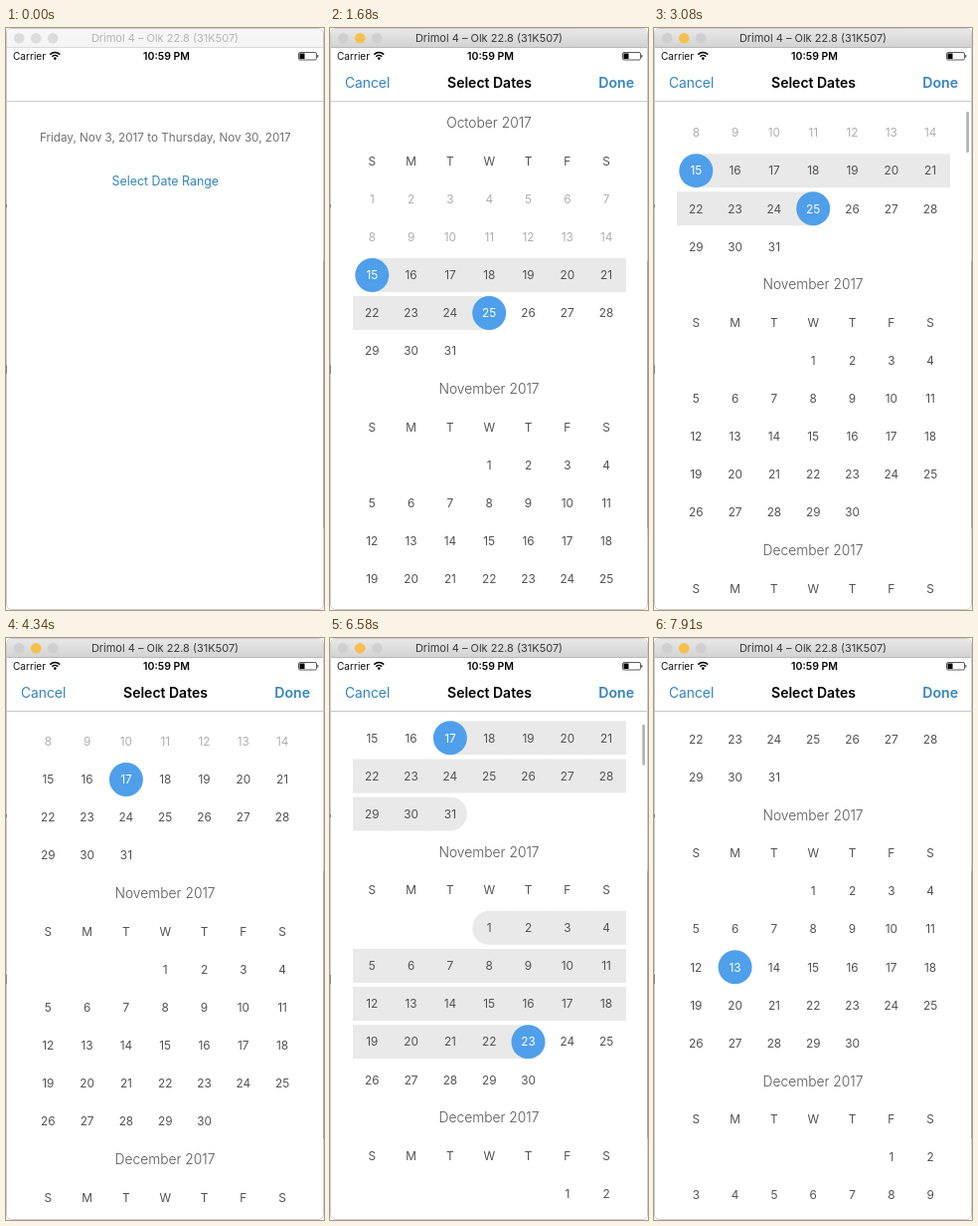
Animation of 320 by 584 pixels, one loop 8 s. Source, as an HTML page with a canvas:

```html
<!DOCTYPE html>
<html lang="en">
<head>
<meta charset="utf-8">
<title>Date range picker</title>
<style>
  html, body { margin: 0; width: 100%; height: 100%; overflow: hidden; background: #fff; }
  canvas { display: block; }
</style>
</head>
<body>
<canvas id="stage" width="320" height="584"></canvas>
<script>
const ctx = document.getElementById('stage').getContext('2d');
const W = 320, H = 584, LOOP = 8000;
const FONT = 'Inter, Roboto, "Liberation Sans", sans-serif';
const BLUE = '#3383c0', DOT = '#4f9fea', BAND = '#e9e9e9', INK = '#505050', MUTED = '#aeaeae';

const HEADER_BOTTOM = 73.5;
const FIRST_ROW = 95.4, ROW = 38.12, FIRST_COL = 42.3, COL = 39.3, RADIUS = 17;
const ENABLED_FROM = 15;
const SHEET_START = 1023.4;

// Days are numbered continuously from October 1, 2017.
const MONTHS = [
  { name: 'October 2017', row: 0, lead: 0, days: 31, first: 1 },
  { name: 'November 2017', row: 7, lead: 3, days: 30, first: 32 },
  { name: 'December 2017', row: 14, lead: 5, days: 31, first: 62 }
];
const SELECTIONS = [
  { at: 0, from: 15, to: 25 },
  { at: 3710, from: 17, to: 17 },
  { at: 5600, from: 17, to: 54 },
  { at: 7840, from: 44, to: 44 }
];
const SCROLLS = [
  { start: 2450, end: 3290, by: 105.9, power: 2 },
  { start: 6230, end: 7070, by: 78.5, power: 1.36 }
];

const clamp = v => Math.min(1, Math.max(0, v));
const smooth = p => p * p * (3 - 2 * p);

function scrollAt(t) {
  return SCROLLS.reduce((sum, s) => {
    const p = clamp((t - s.start) / (s.end - s.start));
    return sum + s.by * smooth(1 - Math.pow(1 - p, s.power));
  }, 0);
}

function indicatorAlpha(t) {
  return Math.max(...SCROLLS.map(s =>
    t < s.start + 40 ? 0 : 1 - clamp((t - s.end) / 170)));
}

// Critically damped spring, as a remaining distance.
function sheetOffset(t) {
  const x = Math.max(0, t - SHEET_START) / 1000 * 18.26;
  return 548 * (1 + x) * Math.exp(-x);
}

function text(str, x, y, size, color, weight = 400, align = 'center') {
  ctx.font = `${weight} ${size}px ${FONT}`;
  ctx.fillStyle = color;
  ctx.textAlign = align;
  ctx.textBaseline = 'alphabetic';
  ctx.fillText(str, x, y + size * 0.36);
}

function rect(x, y, w, h, color) {
  ctx.fillStyle = color;
  ctx.fillRect(x, y, w, h);
}

function circle(x, y, r, color) {
  ctx.fillStyle = color;
  ctx.beginPath();
  ctx.arc(x, y, r, 0, Math.PI * 2);
  ctx.fill();
}

function rounded(x, y, w, h, radii, color) {
  ctx.fillStyle = color;
  ctx.beginPath();
  ctx.roundRect(x, y, w, h, radii);
  ctx.fill();
}

function titleBar(active) {
  const shade = ctx.createLinearGradient(0, 1, 0, 20);
  shade.addColorStop(0, active ? '#e9e8e9' : '#f7f7f7');
  shade.addColorStop(1, active ? '#d3d2d3' : '#f4f4f4');
  rounded(1, 1, 318, 19, [5, 5, 0, 0], shade);
  rect(1, 19, 318, 1, active ? '#b9b9b9' : '#dadada');
  const off = active ? '#cfcfcf' : '#dcdcdc';
  [off, active ? '#f6c04e' : off, off].forEach((c, i) => circle(13.2 + 17 * i, 10.2, 5.3, c));
  text('Drimol 4 – Olk 22.8 (31K507)', 160, 10.3, 11, active ? '#383838' : '#b4b4b4');
}

function statusBar() {
  text('Carrier', 7, 28, 10.1, '#111', 400, 'left');
  text('10:59 PM', 161.5, 28, 10.5, '#000', 600);
  ctx.strokeStyle = '#000';
  ctx.lineWidth = 1.5;
  for (const r of [4.1, 7]) {
    ctx.beginPath();
    ctx.arc(49.3, 31.6, r, -Math.PI * 0.75, -Math.PI * 0.25);
    ctx.stroke();
  }
  circle(49.3, 30.6, 1.3, '#000');
  ctx.lineWidth = 0.8;
  ctx.strokeStyle = '#333';
  ctx.beginPath();
  ctx.roundRect(294.5, 24.5, 18, 7.5, 1.5);
  ctx.stroke();
  rect(295.5, 25.5, 5, 5.5, '#000');
  rect(313.3, 27, 1, 2.6, '#333');
}

function homeScreen(t) {
  rect(1, 73, 318, 1, '#cfcfcf');
  text('Friday, Nov 3, 2017 to Thursday, Nov 30, 2017', 160.3, 109.5, 11.7, '#707070');
  ctx.globalAlpha = t >= 910 ? 0.6 : 1;
  text('Select Date Range', 160.3, 153.4, 12.4, BLUE);
  ctx.globalAlpha = 1;
}

function bandPiece(day, date, col, x, y, month, sel) {
  const opens = day === sel.from, closes = day === sel.to;
  const monthStart = date === 1, monthEnd = date === month.days;
  const left = opens ? x : monthStart ? x - RADIUS : col === 0 ? 23 : x - COL / 2 - 0.3;
  const right = closes ? x : monthEnd ? x + RADIUS : col === 6 ? 298 : x + COL / 2 + 0.3;
  const l = monthStart && !opens ? RADIUS : 0;
  const r = monthEnd && !closes ? RADIUS : 0;
  rounded(left, y - RADIUS, right - left, RADIUS * 2, [l, r, r, l], BAND);
}

function calendar(t) {
  const top = FIRST_ROW - scrollAt(t);
  const sel = SELECTIONS.findLast(s => t >= s.at);
  for (const month of MONTHS) {
    const y = top + month.row * ROW;
    text(month.name, 160, y, 13.8, '#555', 300);
    [...'SMTWTFS'].forEach((d, i) => text(d, FIRST_COL + i * COL, y + ROW, 11.8, INK));

    const cells = Array.from({ length: month.days }, (_, i) => {
      const slot = i + month.lead, col = slot % 7;
      return {
        date: i + 1, day: month.first + i, col,
        x: FIRST_COL + col * COL, y: y + (2 + Math.floor(slot / 7)) * ROW
      };
    });
    for (const c of cells) {
      const inRange = c.day >= sel.from && c.day <= sel.to;
      if (inRange && sel.from !== sel.to) bandPiece(c.day, c.date, c.col, c.x, c.y, month, sel);
    }
    for (const c of cells) {
      const picked = c.day === sel.from || c.day === sel.to;
      if (picked) circle(c.x, c.y, RADIUS, DOT);
      text(c.date, c.x, c.y, 11.8, picked ? '#fff' : c.day < ENABLED_FROM ? MUTED : INK);
    }
  }
}

function sheet(t) {
  ctx.save();
  ctx.translate(0, sheetOffset(t));
  rect(1, 20, 318, H - 20, '#fff');
  calendar(t);
  rect(1, 20, 318, HEADER_BOTTOM - 20, '#fff');
  rect(1, 73, 318, 1, '#c9c9c9');
  text('Cancel', 15, 55, 13.8, BLUE, 400, 'left');
  text('Select Dates', 160.5, 55, 14, '#000', 600);
  text('Done', 306, 55, 14.1, BLUE, 600, 'right');
  ctx.globalAlpha = indicatorAlpha(t);
  rounded(314.3, 77 + scrollAt(t) / 15, 2.6, 41, 1.3, '#b0b0b0');
  ctx.globalAlpha = 1;
  ctx.restore();
}

function windowEdges() {
  ctx.strokeStyle = '#cdcdcd';
  ctx.lineWidth = 1;
  ctx.beginPath();
  ctx.roundRect(0.5, 0.5, W - 1, H - 1, 5);
  ctx.stroke();
  rect(319, 234, 1, 268, '#a9a9a9');
  rect(0, 177, 1, 3, '#888');
  rect(0, 338, 1, 9, '#888');
}

function draw(t) {
  rect(0, 0, W, H, '#fff');
  homeScreen(t);
  if (t >= SHEET_START) sheet(t);
  rect(1, 20, 318, 16, '#fff');
  statusBar();
  titleBar(t >= 910);
  windowEdges();
}

const began = performance.now();
function tick() {
  draw((performance.now() - began) % LOOP);
  requestAnimationFrame(tick);
}
tick();
</script>
</body>
</html>
```
